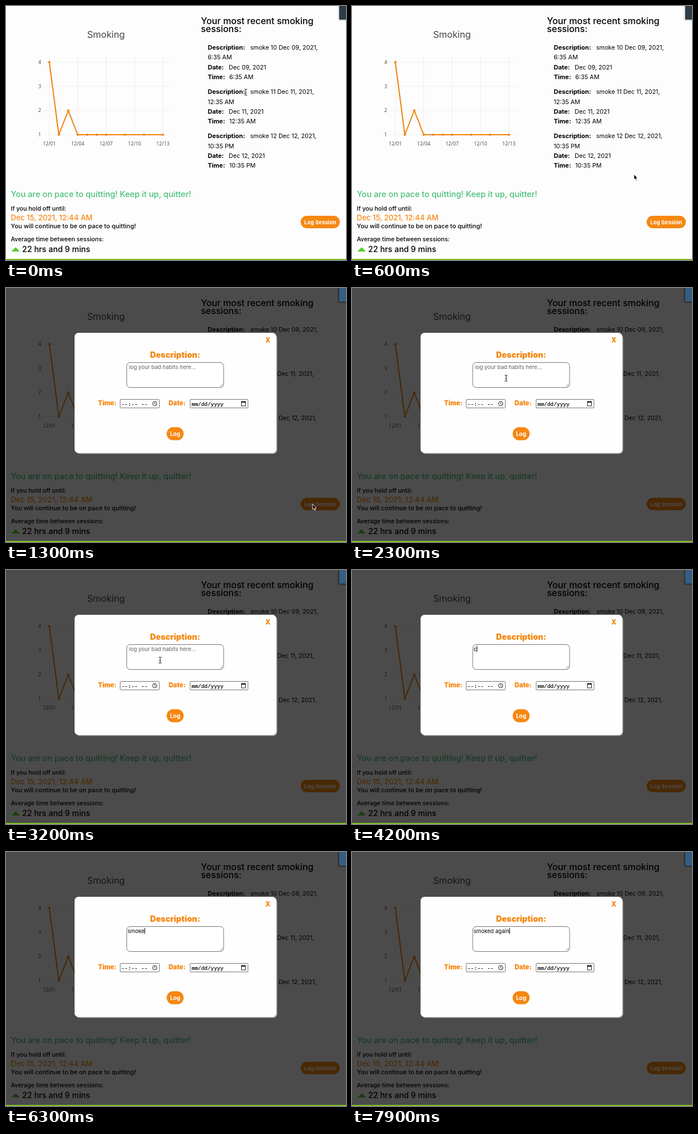
Write an HTML page that moves like this. It is 600x448 px and loops after 8000 ms.

```html
<!DOCTYPE html>
<html lang="en">
<head>
<meta charset="utf-8">
<title>Smoking log</title>
<style>
  html, body { margin: 0; width: 100%; height: 100%; overflow: hidden; background: #fdfdfd; }
  svg { display: block; width: 600px; height: 448px; font-family: Inter, "Open Sans", sans-serif; font-weight: 500; }
  text { white-space: pre; }
  .axis { font: 400 8.7px "Open Sans", sans-serif; fill: #444; }
  .end { text-anchor: end; }
  .mid { text-anchor: middle; }
  .entry { font-size: 10.65px; font-weight: 400; }
  .entry .key { font-size: 11px; font-weight: 700; }
  .small { font-size: 10.6px; }
  .orange { fill: #f68712; }
  .label { font-size: 11.2px; font-weight: 900; }
  .button { font-weight: 700; fill: #fff; }
  .field { fill: #fff; stroke: #767676; }
  .mono { font: 400 9.4px "Liberation Mono", monospace; stroke: #000; stroke-width: .2px; }
  .typed { font-size: 9.6px; font-weight: 400; }
</style>
</head>
<body>
<svg viewBox="0 0 600 448">
  <defs>
    <filter id="soft" x="-50%" y="-50%" width="200%" height="200%"><feGaussianBlur stdDeviation="1.6"/></filter>
  </defs>
  <rect width="600" height="448" fill="#fdfdfd"/>

  <g id="chart">
    <text class="mid" x="176.5" y="56" font-size="16.2" font-weight="400" fill="#444">Smoking</text>
  </g>

  <g font-size="15.9">
    <text x="344" y="31.500">Your most recent smoking</text>
    <text x="344" y="46">sessions:</text>
  </g>
  <g id="sessions" class="entry"></g>

  <text x="8.5" y="337" font-size="14.4" fill="#48c078">You are on pace to quitting! Keep it up, quitter!</text>
  <text class="small" x="8.5" y="361">If you hold off until:</text>
  <text class="orange" x="8.5" y="378" font-size="13">Dec 15, 2021, 12:44 AM</text>
  <text x="8.5" y="391.5" font-size="10.9">You will continue to be on pace to quitting!</text>
  <text class="small" x="8.5" y="414.5">Average time between sessions:</text>
  <path d="M9.500 433L17 425.500L24.500 433Z" fill="#52cc2c"/>
  <text x="28.500" y="434" font-size="14.1">22 hrs and 9 mins</text>

  <rect class="orange" x="520" y="370" width="69" height="22" rx="11"/>
  <text class="button mid" x="554.500" y="384.500" font-size="9.5">Log Session</text>
  <rect x="587" y="-4" width="18" height="29" fill="#777" opacity=".5" filter="url(#soft)"/>
  <rect x="588" width="12" height="24" fill="#2e3c48"/>

  <g id="dialog">
    <rect width="600" height="446" fill="#000" opacity=".7"/>
    <rect x="587" y="-4" width="18" height="29" opacity=".5" filter="url(#soft)"/>
    <rect x="588" width="12" height="24" fill="#365d82"/>
    <rect x="123" y="81" width="355.500" height="211.500" rx="7" fill="#aaa"/>
    <rect x="121" y="79" width="356" height="212" rx="7" fill="#fefefe"/>
    <text class="orange mid" x="462" y="96" font-size="11.5" font-weight="900">X</text>
    <text class="orange mid" x="298.500" y="123" font-size="14.2" font-weight="900">Description:</text>

    <rect class="field" x="213" y="131.500" width="171" height="44" rx="6"/>
    <path d="M377.500 174L383 168.500M380.500 174L383 171.500" stroke="#777" stroke-width=".8"/>
    <text id="hint" x="217" y="142.500" font-size="9.5" fill="#757575">log your bad habits here...</text>
    <text id="typed" class="typed" x="214.500" y="142.500"></text>
    <path id="caret" d="M0 134V144.500" stroke="#000"/>

    <text class="orange label" x="162.500" y="207">Time:</text>
    <rect class="field" x="201.500" y="196.500" width="69" height="15" rx="1"/>
    <text class="mono" x="203.500" y="207.500" style="font-size:9.7px">--:-- --</text>
    <g fill="none" stroke="#222">
      <circle cx="262.500" cy="204" r="3.800"/>
      <path d="M262.500 201.500V204.300L264.300 205.300" stroke-width=".9"/>
    </g>

    <text class="orange label" x="287" y="207">Date:</text>
    <rect class="field" x="325" y="196.500" width="102" height="15" rx="1"/>
    <text class="mono" x="327.500" y="207.500">mm/dd/yyyy</text>
    <rect x="415.500" y="200.500" width="7" height="7.500" fill="none" stroke="#222"/>
    <path d="M415 201.500H423M416.500 199V201M421.500 199V201" stroke="#222" stroke-width="1.500"/>

    <rect class="orange" x="283.500" y="245.500" width="30" height="23" rx="11.500"/>
    <text class="button mid" x="298.500" y="260.500" font-size="10">Log</text>
  </g>

  <rect y="446" width="600" height="2" fill="#80bf25"/>

  <g id="pointer">
    <g data-kind="beam" fill="none">
      <path d="M-2.500 -5.500Q0 -5.500 0 -4Q0 -5.500 2.500 -5.500M0 -4.500V4.500M-2.500 5.500Q0 5.500 0 4Q0 5.500 2.500 5.500M-1.500 1H1.500" stroke="#fff" stroke-width="2"/>
      <path d="M-2.500 -5.500Q0 -5.500 0 -4Q0 -5.500 2.500 -5.500M0 -4.500V4.500M-2.500 5.500Q0 5.500 0 4Q0 5.500 2.500 5.500M-1.500 1H1.500" stroke="#222"/>
    </g>
    <path data-kind="arrow" d="M0 0V9.500L2.200 7.500L3.700 11L5.300 10.300L3.800 7H6.700Z" fill="#000" stroke="#fff" stroke-width=".9"/>
    <path data-kind="hand" d="M-.8 .8Q-.8 -.3 .2 -.3Q1.200 -.3 1.200 .8V4Q2.500 3.200 3 4.300Q4.200 3.700 4.600 4.900Q5.800 4.700 5.800 6V8Q5.800 9.500 4.800 11H.2Q-1 9 -3 6.800Q-3.200 5.300 -1.800 5.700L-.8 6.500Z" fill="#fff" stroke="#000" stroke-width=".9"/>
  </g>
</svg>
<script>
const LOOP = 8000, OPEN = 1250;
const $ = id => document.getElementById(id);

function add(parent, tag, attrs, text = '') {
  const el = document.createElementNS('http://www.w3.org/2000/svg', tag);
  for (const key in attrs) el.setAttribute(key, attrs[key]);
  el.textContent = text;
  return parent.appendChild(el);
}

function drawChart() {
  const chart = $('chart');
  const px = day => 76.5 + (day - 1) * 16.7;
  const py = count => 227 - (count - 1) * 42.6;
  const grid = d => add(chart, 'path', { d, stroke: '#eee' });
  for (let day = 1; day <= 13; day += 3) {
    grid(`M${px(day)} 88V237`);
    add(chart, 'text', { class: 'axis mid', x: px(day), y: 245.5 }, `12/${String(day).padStart(2, '0')}`);
  }
  for (let n = 1; n <= 4; n++) {
    grid(`M66 ${py(n)}H291`);
    add(chart, 'text', { class: 'axis end', x: 62, y: py(n) + 3 }, n);
  }
  const data = [[1, 4], [2, 1], [3, 2], ...[4, 5, 6, 7, 9, 11, 13].map(day => [day, 1])];
  const points = data.map(([day, n]) => [px(day), py(n)]);
  add(chart, 'polyline', { points: points.join(' '), fill: 'none', stroke: '#f0810f', 'stroke-width': 2 });
  for (const [cx, cy] of points) add(chart, 'circle', { cx, cy, r: 2.1, class: 'orange' });
}

function drawSessions() {
  const box = $('sessions');
  const rows = [['smoke 10', 'Dec 09, 2021', '6:35 AM'],
                ['smoke 11', 'Dec 11, 2021', '12:35 AM'],
                ['smoke 12', 'Dec 12, 2021', '10:35 PM']];
  rows.forEach(([name, date, time], i) => {
    const line = (n, x, text, cls = '') => add(box, 'text', { x, y: 77 + i * 78.2 + n * 17.3, class: cls }, text);
    line(0, 356, 'Description:', 'key');
    line(0, 431, `${name} ${date},`);
    line(1, 356, time);
    line(2, 356, 'Date:', 'key');
    line(2, 393, date);
    line(3, 356, 'Time:', 'key');
    line(3, 394, time);
  });
}

// Time at which each character of the final text appears.
const text = 'smoked again';
const keyTimes = [5500, 5700, 5900, 6100, 6250, 6450, 6650, 6850, 7100, 7300, 7450, 7550];

function typedAt(t) {
  if (t >= 3800 && t < 4700) return 'c';
  return text.slice(0, keyTimes.filter(k => k <= t).length);
}

// Moves: start time, end time, from, to.
const moves = [[100, 950, [423, 152], [541, 381]], [1650, 2250, [541, 381], [272, 159]]];

function pointerAt(t) {
  const [start, end, from, to] = t < moves[1][0] ? moves[0] : moves[1];
  const p = Math.min(1, Math.max(0, (t - start) / (end - start)));
  const e = p * p * (3 - 2 * p);
  return from.map((v, i) => v + (to[i] - v) * e);
}

function pointerKind(t, x, y) {
  if (t < OPEN) return x > 520 && y > 370 ? 'hand' : y < 160 ? 'beam' : 'arrow';
  return x > 213 && x < 384 && y > 132 && y < 175 ? 'beam' : 'arrow';
}

const show = (el, on) => { el.style.display = on ? '' : 'none'; };
const caretOn = t => (t >= 2750 && t < 3150) || (t >= 3550 && t < 5150) || t >= 5500;

function render(t) {
  show($('dialog'), t >= OPEN);
  const typed = typedAt(t);
  $('typed').textContent = typed;
  show($('hint'), !typed);
  show($('caret'), caretOn(t));
  if (t >= OPEN) {
    const width = typed ? $('typed').getComputedTextLength() : 0;
    $('caret').setAttribute('transform', `translate(${215 + width})`);
  }
  const [x, y] = pointerAt(t);
  const kind = pointerKind(t, x, y);
  $('pointer').setAttribute('transform', `translate(${x} ${y})`);
  for (const el of $('pointer').children) show(el, t < 3800 && el.dataset.kind === kind);
}

drawChart();
drawSessions();
const began = performance.now();
function tick() {
  render((performance.now() - began) % LOOP);
  requestAnimationFrame(tick);
}
tick();
</script>
</body>
</html>
```
